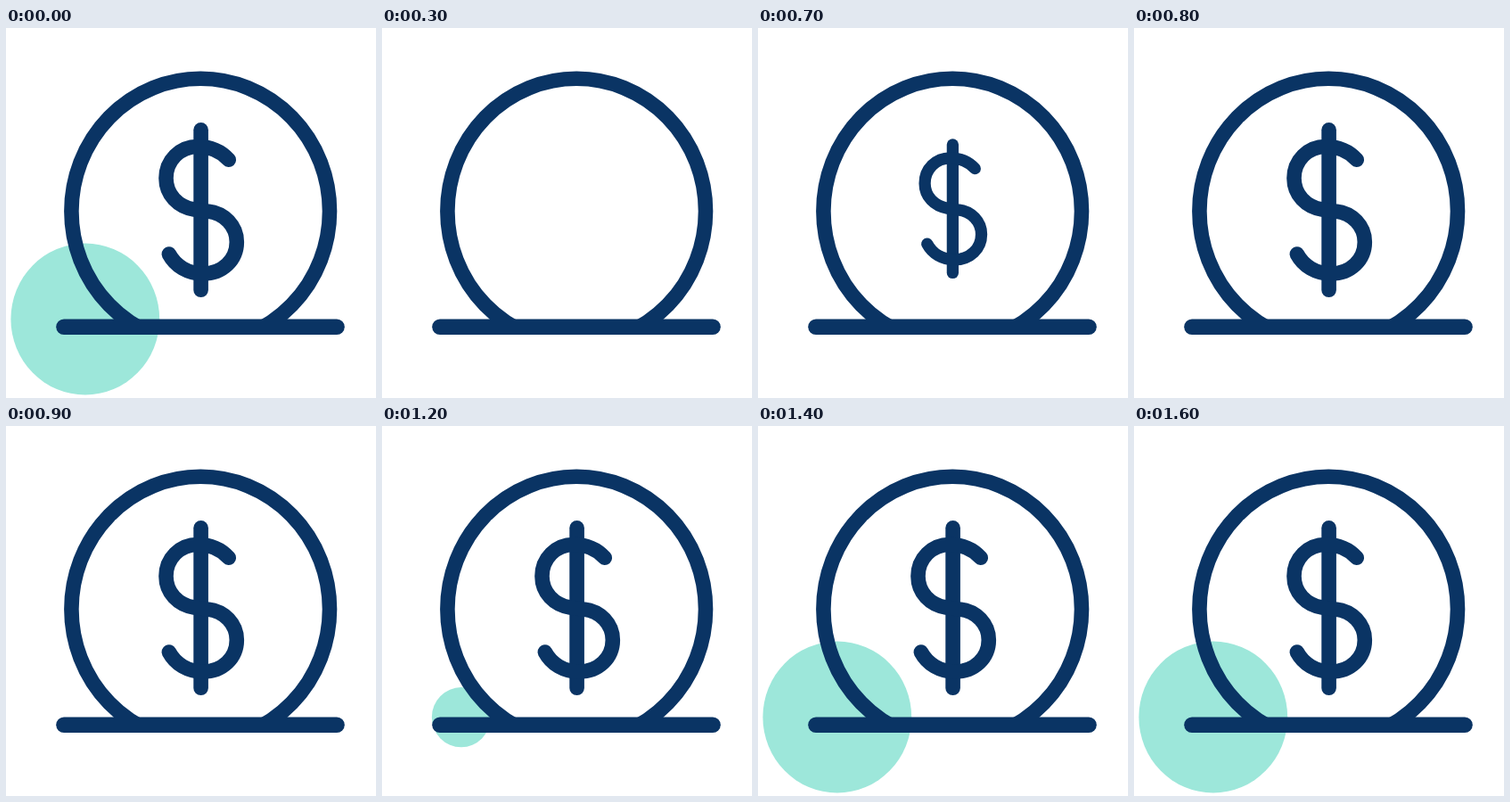
An HTML page that plays this animation: 415 px wide and 415 px high, repeating every 1700 ms.

```html
<!DOCTYPE html>
<html lang="en">
<head>
<meta charset="utf-8">
<title>Coin</title>
<style>
  html, body { margin: 0; width: 100%; height: 100%; overflow: hidden; background: #fff; }
  svg { display: block; width: 100vw; height: 100vh; }
  .line { fill: none; stroke: #0a3464; stroke-width: 16.6; stroke-linecap: round; stroke-linejoin: round; }
</style>
</head>
<body>
<svg viewBox="0 0 415 415">
  <clipPath id="above"><rect width="415" height="336"/></clipPath>
  <ellipse id="spot" cx="88.8" cy="326.5" rx="83.4" ry="85" fill="#9de7da"/>
  <g class="line">
    <ellipse cx="218.2" cy="205.5" rx="144.8" ry="148.7" clip-path="url(#above)"/>
    <path d="M65 335.2H371" stroke-width="17.6"/>
    <g id="dollar">
      <path d="M218.6 114.3V293.8"/>
      <path d="M249.8 147.8C241 138 229 133 215 133C195 133 179.5 148.5 179.5 168.5C179.5 187 193 200.5 211 203.5L226 205.5C245 207.5 258.8 222 258.8 240C258.8 260 243 275.5 221 275.5C204 275.5 190 267 182.8 253.5"/>
    </g>
  </g>
</svg>
<script>
  const LOOP = 1700, STEP = 100;
  const spot = document.getElementById('spot');
  const dollar = document.getElementById('dollar');

  const progress = (t, start, end) => Math.min(1, Math.max(0, (t - start) / (end - start)));

  function scaleAbout(el, x, y, s) {
    el.setAttribute('visibility', s > 0 ? 'visible' : 'hidden');
    el.setAttribute('transform', `translate(${x} ${y}) scale(${s}) translate(${-x} ${-y})`);
  }

  function draw(ms) {
    // the motion advances in held steps
    const t = Math.floor((ms % LOOP) / STEP) * STEP;
    const resting = t < 300;
    scaleAbout(dollar, 217.5, 197, resting ? 1 : progress(t, 300, 800));
    scaleAbout(spot, 88.8, 326.8, resting ? 1 : progress(t, 1000, 1400) ** 1.34);
  }

  const begin = performance.now();
  function tick() {
    draw(performance.now() - begin);
    requestAnimationFrame(tick);
  }
  tick();
</script>
</body>
</html>
```
